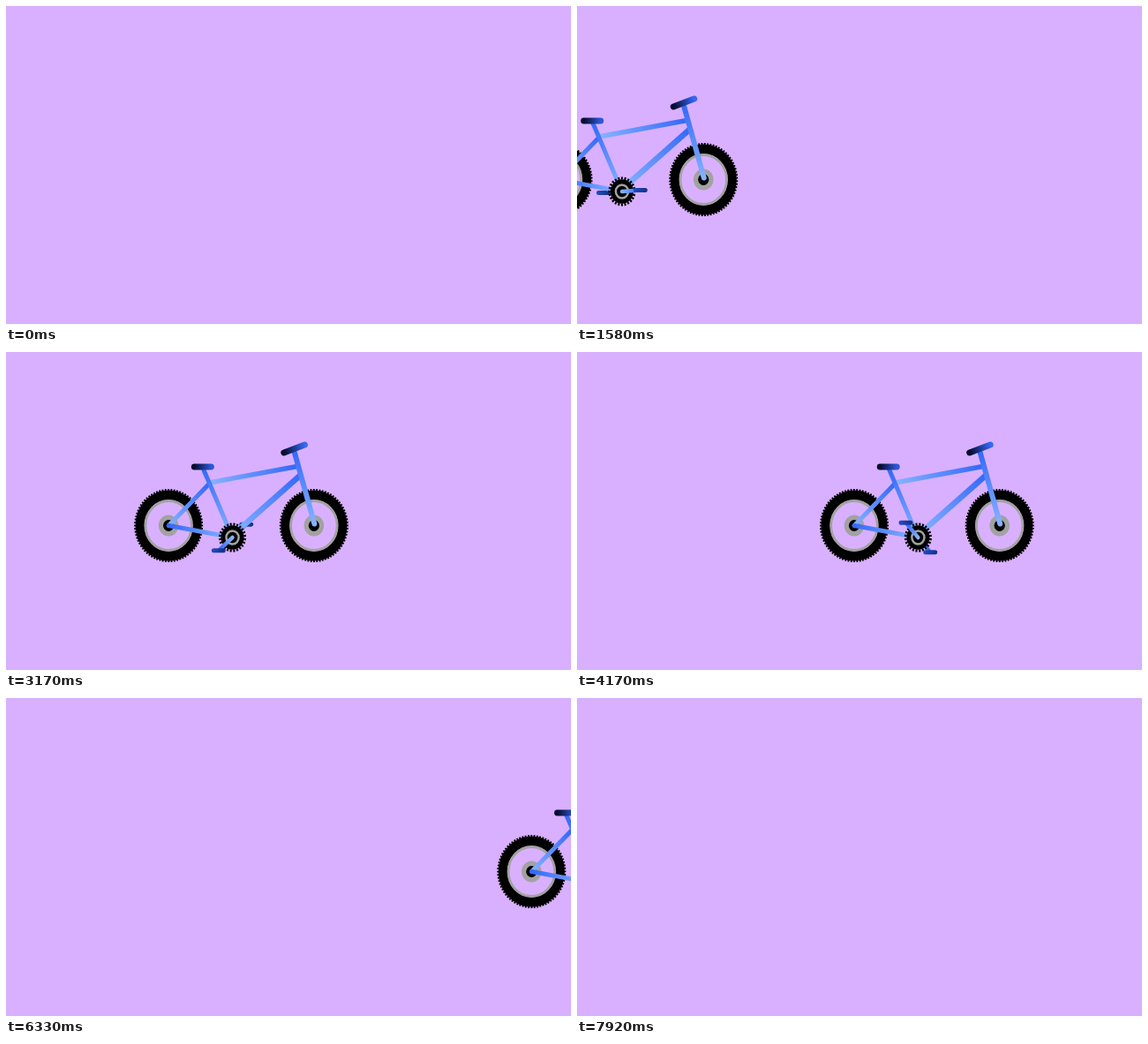
An HTML page for the animation above (8.01 s loop, 640x360 px).

```html
<!DOCTYPE html>
<html lang="en">
<head>
<meta charset="utf-8">
<title>Bicycle</title>
<style>
  html, body { margin: 0; width: 100%; height: 100%; overflow: hidden; background: #d9b0ff; }
  svg { display: block; width: 100vw; height: 100vh; }
</style>
</head>
<body>
<svg id="stage" viewBox="0 0 640 360">
  <rect width="640" height="360" fill="#d9b0ff"/>
  <g id="bike"></g>
</svg>
<script>
const NS = 'http://www.w3.org/2000/svg';
const LOOP = 8010, STEPS = 96, STEP_MS = 250 / 3;
const SPEED = 10.82, TURN = 7.5, REF_STEP = 26, REF_ANGLE = 48.5;
const SQUEEZE = 0.94;
const REAR = [54.3, 196.5], FRONT = [219, 196.5], CRANK = [126.7, 210];
const LIGHT = '#86b2ff', BLUE = '#3468f8', NAVY = '#060a2c';

const bike = document.getElementById('bike');

function add(parent, tag, attrs = {}) {
  const el = document.createElementNS(NS, tag);
  for (const key in attrs) el.setAttribute(key, attrs[key]);
  parent.appendChild(el);
  return el;
}

let gradientCount = 0;
function tube(parent, x1, y1, x2, y2, from, to, width, cap = 'round') {
  const id = 'shade' + gradientCount++;
  const ends = { x1, y1, x2, y2 };
  const gradient = add(parent, 'linearGradient', { id, gradientUnits: 'userSpaceOnUse', ...ends });
  add(gradient, 'stop', { offset: 0, 'stop-color': from });
  add(gradient, 'stop', { offset: 1, 'stop-color': to });
  add(parent, 'line', { ...ends, stroke: `url(#${id})`, 'stroke-width': width, 'stroke-linecap': cap });
}

function ring(parent, r, width, color, attrs = {}) {
  return add(parent, 'circle', { r, fill: 'none', stroke: color, 'stroke-width': width, ...attrs });
}

function teeth(parent, r, width, count) {
  return ring(parent, r, width, '#000', { pathLength: count * 2, 'stroke-dasharray': '1.1 .9' });
}

function squeezed([x, y]) {
  return add(bike, 'g', { transform: `translate(${x} ${y}) scale(${SQUEEZE} 1)` });
}

function wheel(center) {
  const g = squeezed(center);
  ring(g, 34.5, 11, '#000');
  const knobs = teeth(g, 40.5, 2, 72);
  ring(g, 28, 3, '#a2a2a2');
  add(g, 'circle', { r: 12, fill: '#a2a2a2' });
  add(g, 'circle', { r: 6.5, fill: '#000' });
  return knobs;
}

function pedal() {
  const g = add(bike, 'g');
  const arm = add(g, 'g');
  tube(arm, 0, 0, 20, 0.01, LIGHT, BLUE, 4.5);
  const foot = add(g, 'g');
  tube(foot, -5.5, 0, 5.5, 0.01, '#2149b8', '#14348f', 5);
  return { arm, foot };
}

function posePedal({ arm, foot }, angle) {
  const rad = angle * Math.PI / 180;
  const [cx, cy] = CRANK;
  arm.setAttribute('transform', `translate(${cx} ${cy}) scale(${SQUEEZE} 1) rotate(${angle})`);
  foot.setAttribute('transform',
    `translate(${cx + 22.3 * SQUEEZE * Math.cos(rad)} ${cy + 22.3 * Math.sin(rad)})`);
}

const spinning = [wheel(REAR), wheel(FRONT)];
const farPedal = pedal();

tube(bike, 54.5, 196.5, 100, 149.5, LIGHT, BLUE, 5);
tube(bike, 103, 147.5, 200, 129.5, LIGHT, BLUE, 5.5);
tube(bike, 130, 204.5, 203, 140, LIGHT, BLUE, 6.5);
tube(bike, 93.5, 132, 125, 206, BLUE, LIGHT, 5);
tube(bike, 54.5, 196.5, 122, 209, BLUE, LIGHT, 5);
tube(bike, 196.5, 112, 219.5, 194.5, BLUE, LIGHT, 6);
tube(bike, 185, 114, 208.5, 105, NAVY, BLUE, 7);
tube(bike, 83.5, 130, 102.5, 130.01, NAVY, '#2c58d8', 7);

const sprocket = squeezed(CRANK);
add(sprocket, 'circle', { r: 13.8, fill: '#000' });
spinning.push(teeth(sprocket, 15, 3, 24));
ring(sprocket, 7.5, 2.6, '#a2a2a2');
const nearPedal = pedal();

function stepAt(t) {
  let n = Math.min(STEPS - 1, Math.ceil(t / STEP_MS) + 1);
  while (n > 0 && Math.round(n * STEP_MS / 10) * 10 > t) n--;
  return n;
}

function draw(t) {
  const n = stepAt(t);
  const angle = REF_ANGLE + TURN * (n - REF_STEP);
  bike.setAttribute('transform', `translate(${SPEED * (n - REF_STEP)} 0)`);
  for (const part of spinning) part.setAttribute('transform', `rotate(${angle})`);
  posePedal(nearPedal, angle);
  posePedal(farPedal, angle + 180);
}

const start = performance.now();
function tick() {
  draw((performance.now() - start) % LOOP);
  requestAnimationFrame(tick);
}
tick();
</script>
</body>
</html>
```
